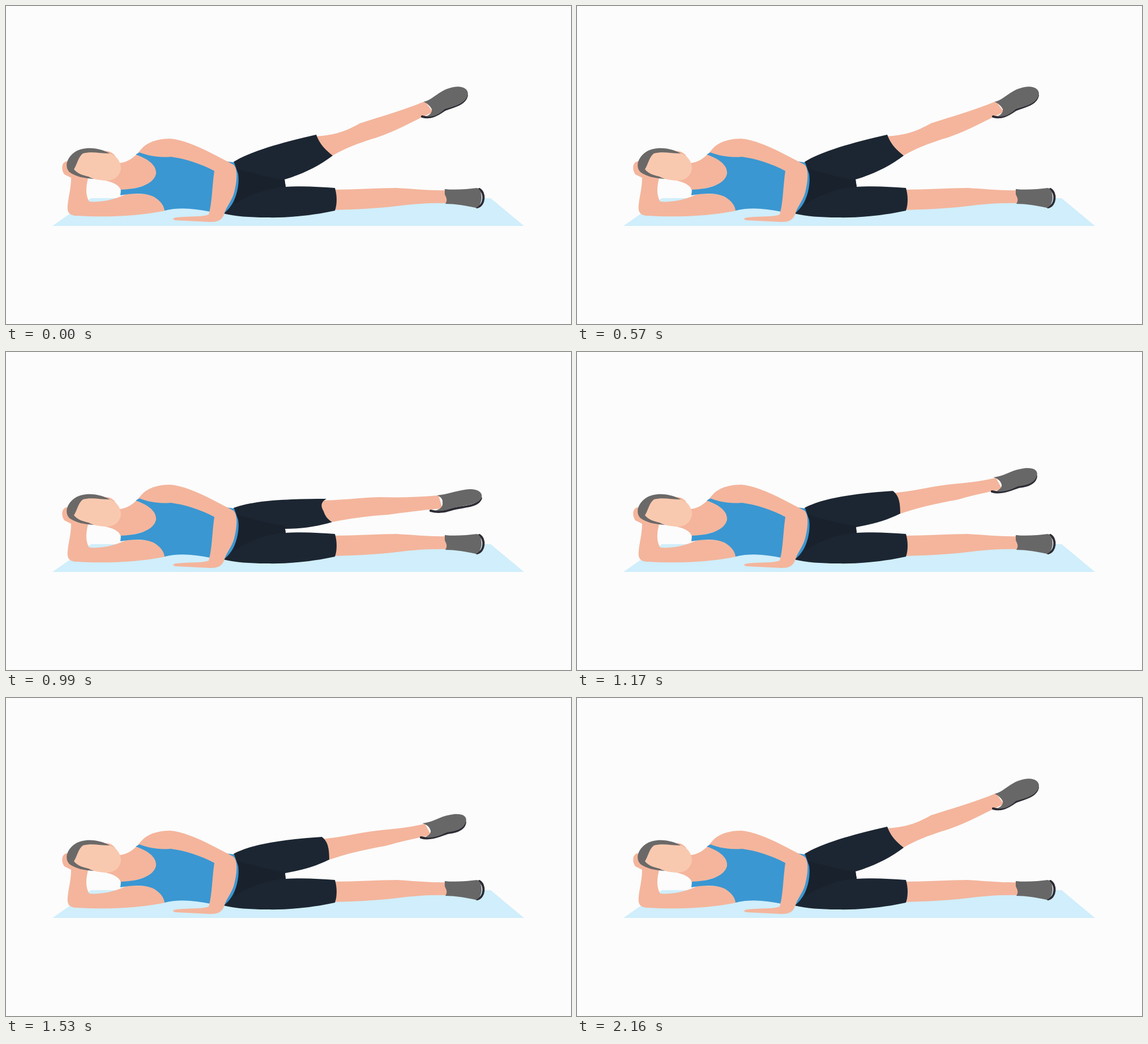
Write an HTML page that moves like this. It is 998 px wide and 561 px high and loops after 2190 ms.

```html
<!DOCTYPE html>
<html lang="en">
<head>
<meta charset="utf-8">
<title>Side leg raise</title>
<style>
  html, body { margin: 0; width: 100%; height: 100%; overflow: hidden; background: #fcfcfc; }
  svg { display: block; width: 100%; height: 100%; }
  #scene { filter: blur(.7px); }
  .mat { fill: #d0eefb; }
  .skin { fill: #f4b59c; }
  .face { fill: #f9c9af; }
  .hair { fill: #6b6968; }
  .shirt { fill: #3a97d2; }
  .shorts { fill: #1c2632; }
  .shade { fill: #19212c; }
  .shoe { fill: #686767; }
  .sole { fill: none; stroke: #2d2b34; stroke-width: 4; stroke-linecap: round; stroke-linejoin: round; }
  .pose { visibility: hidden; }
</style>
</head>
<body>
<svg viewBox="0 0 998 561" preserveAspectRatio="none">
  <g id="scene">
    <path class="mat" d="M82 388 L112 367 L150 339 H856 L915 388Z"/>

    <!-- resting leg -->
    <path class="skin" d="M578 324 C620 324 655 321 690 321 C725 323 750 326 780 325 V348 C750 347 720 349 690 353 C655 357 615 359 578 360Z"/>
    <path class="sole" d="M836 323 C847 329 846 352 832 355"/>
    <path class="shoe" d="M775 323 C795 325 815 323 832 321 C843 325 843 352 830 356 C810 352 795 349 776 349 C781 342 777 337 775 332Z"/>
    <path class="shorts" d="M402 300 L494 319 C525 317 555 319 581 321 C585 334 585 350 581 361 C545 369 500 374 460 373 C430 373 405 371 384 366Z"/>

    <!-- raised leg -->
    <g class="pose" id="up">
      <path class="skin" d="M543 230 C580 229 602 220 625 207 C665 194 705 183 740 168 L754 187 C720 203 690 220 655 232 C625 241 598 251 573 266Z"/>
      <path class="sole" d="M735 195 C752 200 764 190 775 183 C795 176 811 172 814 158"/>
      <path class="shoe" d="M738 169 C752 166 765 150 783 145 C805 137 820 147 815 159 C809 174 790 177 775 182 C765 191 757 196 741 195 C750 192 753 187 752 182 C749 176 744 172 738 169Z"/>
      <path class="shorts" d="M402 275 C430 257 490 240 548 227 C554 243 563 253 577 264 C550 284 525 296 492 306 L494 319 L420 345Z"/>
    </g>
    <g class="pose" id="mid">
      <path class="skin" d="M556 249 C595 246 625 237 655 234 C685 231 715 228 740 222 L751 242 C720 248 695 254 670 261 C635 267 600 275 566 287Z"/>
      <path class="sole" d="M733 246 C750 251 768 242 780 238 C798 236 810 230 811 219"/>
      <path class="shoe" d="M735 221 C755 219 766 209 785 206 C806 202 816 209 812 219 C807 233 793 235 779 237 C766 243 757 247 739 246 C747 243 751 238 750 234 C748 227 743 223 735 221Z"/>
      <path class="shorts" d="M402 275 C435 257 495 249 558 245 C569 253 571 267 571 285 C547 297 522 304 493 309 L494 319 L420 345Z"/>
    </g>
    <g class="pose" id="low">
      <path class="skin" d="M550 262 C590 262 625 257 660 256 C695 257 730 256 764 253 L771 276 C735 279 705 283 675 287 C640 289 605 294 570 301Z"/>
      <path class="sole" d="M750 280 C765 284 776 281 786 278 C805 272 834 274 839 258"/>
      <path class="shoe" d="M761 253 C780 251 795 245 810 243 C831 239 843 247 840 257 C834 271 806 270 786 276 C776 280 767 281 756 280 C768 278 772 272 771 266 C772 260 768 255 761 253Z"/>
      <path class="shorts" d="M402 275 C440 261 500 259 566 259 C554 266 557 274 561 281 C564 290 569 296 576 300 C550 308 520 312 493 312 L494 319 L420 345Z"/>
    </g>
    <path class="shade" d="M404 286 C435 294 466 304 492 306 L494 319 C465 320 430 332 404 350Z"/>

    <!-- supporting arm -->
    <path class="skin" d="M107 274 C98 276 97 288 103 297 L115 303 C115 322 110 337 109 351 C107 366 114 370 126 370 C172 373 235 371 281 361 L270 332 L215 331 C192 341 170 347 147 345 C140 334 141 319 145 304 L125 280Z"/>

    <!-- torso -->
    <path class="skin" d="M192 277 C212 279 224 269 237 255 L270 275 V310 L203 328 C203 319 194 312 176 308Z"/>
    <path class="shirt" d="M238 257 L229 262 C252 270 266 281 265 296 C261 314 235 323 203 324 L202 334 C225 330 247 329 262 337 C273 344 279 352 280 361 C308 354 335 358 361 363 L386 365 C408 348 413 313 410 296 L403 276 L288 260Z"/>
    <path class="skin" d="M235 258 C244 242 265 234 290 234 C325 237 369 263 402 280 C410 288 408 310 403 329 C399 344 389 354 385 368 C381 378 374 381 361 381 C340 380 320 379 300 378 C293 377 294 374 301 373 C325 370 344 373 358 368 C364 349 364 318 368 291 C344 278 315 269 291 266 C270 268 250 264 235 258Z"/>

    <!-- head -->
    <path class="skin" d="M168 257 C177 254 188 257 193 265 L180 275Z"/>
    <path class="hair" d="M183 260 C164 249 137 247 121 258 C107 268 103 284 112 293 C123 301 138 304 155 305 L165 275Z"/>
    <path class="face" d="M136 260 C151 256 167 260 180 260 C194 261 204 275 203 288 C200 302 189 309 174 308 C163 307 153 305 146 301 C132 298 125 294 120 288 C126 279 127 267 136 260Z"/>
  </g>
</svg>
<script>
  const LOOP = 2190;
  const steps = [
    [0, 'up'], [30, 'mid'], [210, 'low'], [390, 'mid'],
    [570, 'up'], [780, 'mid'], [960, 'low'], [1140, 'mid'],
    [1320, 'up'], [1500, 'mid'], [1710, 'low'], [1890, 'mid'],
    [2100, 'up']
  ];
  const poses = [...document.querySelectorAll('.pose')];
  const start = performance.now();

  function draw(now) {
    const t = Math.max(0, now - start) % LOOP;
    const name = steps.filter(([at]) => at <= t).pop()[1];
    for (const p of poses) p.style.visibility = p.id === name ? 'visible' : 'hidden';
    requestAnimationFrame(draw);
  }
  draw(start);
</script>
</body>
</html>
```
